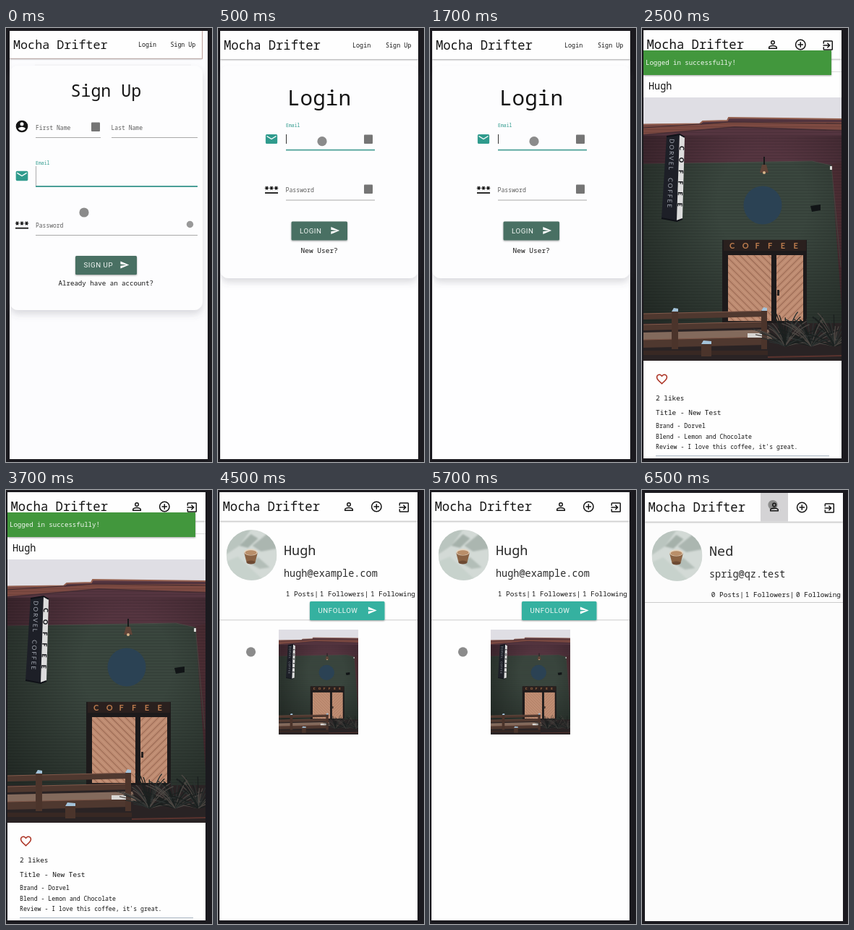
An HTML page for the animation above (8000 ms loop, 285x600 px).

```html
<!DOCTYPE html>
<html lang="en">
<head>
<meta charset="utf-8">
<title>Coffee app walkthrough</title>
<style>
html, body { margin: 0; width: 100%; height: 100%; overflow: hidden; background: #1b1a1f; }
svg { display: block; width: 100%; height: 100%; }
text { font-family: "Noto Sans Mono", "DejaVu Sans Mono", monospace; white-space: pre; }
.btn { font-family: Roboto, Inter, sans-serif; letter-spacing: .55px; }
.sign { font-family: Lato, Inter, sans-serif; }
</style>
</head>
<body>
<svg id="stage" viewBox="0 0 285 600"></svg>
<script>
const TEAL = '#2f9b8d', INK = '#151515', GREY = '#5c5c5c', LINE = '#a9a9a9';
const ICONS = {
  person: 'M12 5.9a2.1 2.1 0 110 4.2 2.1 2.1 0 010-4.2m0 9c2.97 0 6.1 1.46 6.1 2.1v1.1H5.9V17c0-.64 3.13-2.1 6.1-2.1M12 4a4 4 0 100 8 4 4 0 000-8zm0 9c-2.67 0-8 1.34-8 4v3h16v-3c0-2.66-5.33-4-8-4z',
  add: 'M13 7h-2v4H7v2h4v4h2v-4h4v-2h-4V7zm-1-5a10 10 0 100 20 10 10 0 000-20zm0 18a8 8 0 110-16 8 8 0 010 16z',
  exit: 'M10.1 15.6L11.5 17l5-5-5-5-1.4 1.4 2.6 2.6H3v2h9.7l-2.6 2.6zM19 3H5a2 2 0 00-2 2v4h2V5h14v14H5v-4H3v4a2 2 0 002 2h14a2 2 0 002-2V5a2 2 0 00-2-2z',
  account: 'M12 2a10 10 0 100 20 10 10 0 000-20zm0 3a3 3 0 110 6 3 3 0 010-6zm0 14.2a7.2 7.2 0 01-6-3.2c0-2 4-3.1 6-3.1s6 1.1 6 3.1a7.2 7.2 0 01-6 3.2z',
  mail: 'M20 4H4a2 2 0 00-2 2v12a2 2 0 002 2h16a2 2 0 002-2V6a2 2 0 00-2-2zm0 4l-8 5-8-5V6l8 5 8-5v2z',
  send: 'M2 21l21-9L2 3v7l15 2-15 2v7z',
  heart: 'M16.5 3c-1.74 0-3.41.81-4.5 2.09C10.91 3.81 9.24 3 7.5 3 4.42 3 2 5.42 2 8.5c0 3.78 3.4 6.86 8.55 11.54L12 21.35l1.45-1.32C18.6 15.36 22 12.28 22 8.5 22 5.42 19.58 3 16.5 3zm-4.4 15.55l-.1.1-.1-.1C7.14 14.24 4 11.39 4 8.5 4 6.5 5.5 5 7.5 5c1.54 0 3.04.99 3.57 2.36h1.87C13.46 5.99 14.96 5 16.5 5c2 0 3.5 1.5 3.5 3.5 0 2.89-3.14 5.74-7.9 10.05z'
};

const rect = (x, y, w, h, fill, extra = '') =>
  `<rect x="${x}" y="${y}" width="${w}" height="${h}" fill="${fill}" ${extra}/>`;
const circle = (x, y, r, fill) => `<circle cx="${x}" cy="${y}" r="${r}" fill="${fill}"/>`;
const ellipse = (x, y, rx, ry, fill) => `<ellipse cx="${x}" cy="${y}" rx="${rx}" ry="${ry}" fill="${fill}"/>`;
const poly = (points, fill) => `<polygon points="${points}" fill="${fill}"/>`;
const path = (d, stroke, width = 1) =>
  `<path d="${d}" fill="none" stroke="${stroke}" stroke-width="${width}"/>`;
// step is the advance of one monospaced character
const text = (s, x, y, step, fill = INK) =>
  `<text x="${x}" y="${y}" font-size="${step / .6}" fill="${fill}">${s}</text>`;
const icon = (name, x, y, size, fill = INK) =>
  `<path d="${ICONS[name]}" fill="${fill}" fill-rule="evenodd" transform="translate(${x - size / 2} ${y - size / 2}) scale(${size / 24})"/>`;
const pointer = (x, y) => circle(x, y, 6.6, '#8b8b8b');
const page = (x, y, fill) => rect(x, y, 274, 592, fill);
const card = (x, w, bottom) =>
  rect(x, 52, w, bottom - 52, '#fdfdfe', 'rx="12" filter="url(#soft)"');

function nav(x, y, w, bottom) {
  return rect(x, y, w, bottom - y, '#fefefe', 'filter="url(#drop)"');
}
function appNav(x, y) {
  return nav(x, y, 274, y + 39.5) + text('Mocha Drifter', x + 4.5, y + 26, 10.35) +
    icon('add', x + 217.3, y + 20, 18) + icon('exit', x + 255.3, y + 21, 18);
}
function button(label, x, y, w, fill) {
  return rect(x, y, w, 26, fill, 'rx="1.5" filter="url(#drop)"') +
    `<text class="btn" x="${x + 11.5}" y="${y + 16}" font-size="9.7" fill="#f4f8f6">${label}</text>` +
    icon('send', x + w - 17, y + 12.5, 13.5, '#fff');
}
const underline = (x1, x2, y) => path(`M${x1} ${y}H${x2}`, LINE);
function emailField(x, x2, label, y) {
  return text('Email', x, label, 3.9, TEAL) + path(`M${x} ${y}H${x2}`, '#4b9f97', 1.8);
}
function secret(x, y) {
  const stars = [3, 9.5, 16].map(d =>
    `M${x + d - 2.7} ${y}h5.4M${x + d - 1.4} ${y - 2.4}l2.8 4.8M${x + d + 1.4} ${y - 2.4}l-2.8 4.8`).join('');
  return path(stars, INK, 1.2) + path(`M${x + .5} ${y + 6.7}h18`, INK, 1.8);
}
const filler = (x, y) => rect(x, y, 12, 12.5, '#757575', 'rx="1"');
const avatar = (x, y) => `<use href="#avatar" x="${x}" y="${y}" width="70" height="70"/>`;
const photo = (x, y, w, h) => `<use href="#photo" x="${x}" y="${y}" width="${w}" height="${h}"/>`;

function profile(x, y, name, mail, posts, following) {
  return avatar(x + 9.5, y + 52) + text(name, x + 89, y + 87, 11.1, '#2a2a2a') +
    text(mail, x + 89, y + 116.5, 8.12, '#2a2a2a') +
    text(posts + ' Posts|', x + 91.8, y + 143.7, 5.63) +
    text('1 Followers|', x + 138.8, y + 143.7, 5.63) +
    text(following + ' Following', x + 209, y + 143.7, 5.63);
}

function plants() {
  let seed = 7, out = '';
  const rand = () => (seed = seed * 16807 % 2147483647) / 2147483647;
  for (let i = 0; i < 110; i++) {
    const x = [198, 234, 266][i % 3], a = -Math.PI * (.05 + .9 * rand()), r = 22 + 32 * rand();
    out += path(`M${x} 440Q${x + Math.cos(a) * r * .5} ${440 + Math.sin(a) * r * .8} ${x + Math.cos(a) * r} ${440 + Math.sin(a) * r}`,
      ['#1b201f', '#2b3130', '#4d4844'][i % 7 % 3], 1.3);
  }
  return out;
}

function signText(s, x, y, size, gap, fill, weight) {
  return `<text class="sign" transform="translate(${x} ${y}) rotate(92)" font-size="${size}" letter-spacing="${gap}" font-weight="${weight}" fill="${fill}">${s}</text>`;
}

function shopFront() {
  const bricks = (points, fill) => poly(points, fill) + poly(points, 'url(#bricks)');
  const rail = (y, h) => poly(`2,${y + 4} 173,${y} 173,${y + h} 2,${y + h + 4}`, '#4f382f') +
    path(`M2 ${y + 4}L173 ${y}`, '#80594a', 1.2);
  const post = (x, y, w, h) => rect(x, y, w, h, '#4b342b') +
    poly(`${x},${y + 1} ${x + 3},${y - 4} ${x + w},${y - 3} ${x + w},${y + 1}`, '#a4c3da');
  return rect(2, 96, 274, 364, '#dfdee4') +
    bricks('2,133 80,132 84,129 118,128 120,124 276,126 276,460 2,460', '#553540') +
    bricks('2,135 80,134 120,130 276,130 276,141 128,136 2,147', '#7d4a42') +
    path('M2 133.5L80 132.5L84 129L118 128L120 124L276 126', '#94604f', 2) +
    path('M2 138L122 130L276 132M2 148L128 137L276 142', '#432c30', 1.2) +
    bricks('2,188 235,184 262,190 276,300 276,460 2,460', '#3a463e') +
    bricks('262,188 276,185 276,385 272,330', '#543239') +
    path('M2 188L235 184L262 190L275 330', '#4e514a', .9) +
    rect(2, 149, 274, 311, 'url(#shade)') +
    // blade sign
    poly('34,150 52,147 48,267 27,263', '#1d1f27') + poly('52,147 59,151 56,264 48,267', '#dddddd') +
    path('M34 150L52 147L59 151M27 263L48 267L56 264', '#0f1117', 2) +
    signText('DORVEL', 38.5, 153, 8.5, 1.9, '#a5aab4', 400) + signText('COFFEE', 36.5, 207, 8.5, 1.9, '#a5aab4', 400) +
    signText('COFFEE', 52, 163, 9, 10, '#17181c', 900) +
    circle(167, 245, 26.5, '#2b4254') +
    // lamps
    path('M169 178V190', '#191a1b', 2) + poly('166,189 172,189 175,200 163,200', '#604438') + circle(169, 200, 2, '#d8b58b') +
    poly('233,246 247,244 247,252 235,254', '#111416') + rect(260, 191, 3, 5, '#d9d9d6') +
    // doorway
    rect(111, 293, 117, 116, '#1d1a1b') + rect(113, 293, 114, 15, '#2a201e') +
    [...'COFFEE'].map((c, i) => `<text class="sign" x="${121 + i * 17.7}" y="304.5" font-size="11" font-weight="700" fill="#bb7b4d">${c}</text>`).join('') +
    rect(119, 314, 60, 91, 'url(#planksL)') + rect(186, 314, 37, 91, 'url(#planksR)') +
    rect(187, 362, 3, 8, '#262120') +
    // pavement and fence
    rect(2, 408, 274, 52, '#2a2324') + poly('2,421 175,417 180,430 2,432', '#836a5c') +
    rail(391, 8) + rail(406, 8) + rail(427, 11) + rect(2, 446, 172, 6, '#382823') +
    post(41, 391, 9, 53) + post(165, 390, 8, 54) + post(82, 436, 14, 18) + rect(146, 422, 20, 6, '#d8d6d3') +
    plants() + poly('174,442 276,440 276,460 174,460', '#292324') + path('M174 455L276 453', '#5a332e', 2);
}

const planks = (id, angle) =>
  `<pattern id="${id}" width="7" height="7" patternUnits="userSpaceOnUse" patternTransform="rotate(${angle})">${rect(0, 0, 7, 7, '#bd8a70')}${path('M0 .5H7', '#8f614b', .8)}${path('M0 4H7', '#c6957b', 1.5)}</pattern>`;

const defs = `<defs>
  <filter id="drop" x="-10%" y="-20%" width="120%" height="160%"><feDropShadow dx="0" dy="1" stdDeviation="1" flood-opacity=".36"/></filter>
  <filter id="soft" x="-10%" y="-10%" width="120%" height="120%"><feDropShadow dx="0" dy="6" stdDeviation="5" flood-color="#55556a" flood-opacity=".2"/></filter>
  <filter id="blur"><feGaussianBlur stdDeviation="1.3"/></filter>
  <radialGradient id="shade" cx=".6" cy=".3" r=".75"><stop offset=".3" stop-opacity="0"/><stop offset="1" stop-opacity=".4"/></radialGradient>
  <pattern id="bricks" width="11" height="4" patternUnits="userSpaceOnUse"><path d="M0 .5H11" stroke="#000" stroke-width=".8" opacity=".14"/></pattern>
  ${planks('planksL', 45)}${planks('planksR', -45)}
  <clipPath id="disc"><circle cx="35" cy="35" r="35"/></clipPath>
  <symbol id="photo" viewBox="2 96 274 364" preserveAspectRatio="none">${shopFront()}</symbol>
  <symbol id="avatar" viewBox="0 0 70 70"><g clip-path="url(#disc)">
    ${rect(0, 0, 70, 70, '#d3dad6')}
    <g filter="url(#blur)">${poly('0,0 34,0 18,22 0,34', '#bac5bf')}${poly('18,22 34,6 44,12 30,25', '#a5b1aa')}
    ${poly('36,22 56,6 70,14 70,26 48,30', '#abb6b0')}${poly('0,44 16,37 28,48 52,70 0,70', '#c7d2cc')}
    ${poly('32,46 44,38 60,52 46,54', '#b3beb8')}</g>
    ${poly('24.5,31 43.5,31 40,45 28,45', '#8a6243')}${ellipse(34, 45, 6, 2.5, '#6d4a33')}
    ${ellipse(34, 31, 9.5, 4.5, '#e3d5c2')}${ellipse(34, 31.7, 8, 3.4, '#b98e69')}
  </g></symbol>
</defs>`;

const signUp = page(5, 4, '#fcfcfe') + card(5, 267, 390) + rect(271, 4, 1, 39, '#dcb8b2') + nav(5, 4, 266, 42) +
  path('M5 42.3H271', '#bfa6a3', .8) + path('M40 51H256', '#eeeef0') +
  text('Mocha Drifter', 10, 29.3, 10.05) + text('Login', 183, 26, 5) + text('Sign Up', 227.5, 26, 4.95) +
  text('Sign Up', 89.5, 94.5, 13.95) +
  icon('account', 22, 136, 20) + text('First Name', 41, 141, 4.83, GREY) + underline(41, 131, 151.5) + filler(118, 130.5) +
  text('Last Name', 145.5, 141, 4.83, GREY) + underline(146, 265, 151.5) +
  icon('mail', 22, 204.5, 20, TEAL) + emailField(41, 265, 188.5, 219) + path('M41.5 191V218', '#999', .8) +
  secret(12.5, 270) + text('Password', 41, 275.7, 4.8, GREY) + underline(41, 265, 286.5) + circle(254.5, 271.5, 4.7, '#999') +
  pointer(108, 255) + button('SIGN UP', 96, 315, 85, '#4a6f64') + text('Already have an account?', 72.5, 356, 5.48);

const login = page(3, 4, '#fefeff') + card(3, 274, 346) + nav(3, 4, 274, 43) +
  text('Mocha Drifter', 8, 30, 10.3) + text('Login', 186, 26.7, 5.05) + text('Sign Up', 232, 26.7, 5.05) +
  text('Login', 96, 107, 17.6) +
  icon('mail', 74, 153.5, 19.5, TEAL) + emailField(94, 217, 137, 168.7) + path('M94.5 147V160', '#333') + filler(202, 147.5) +
  secret(64.5, 221.3) + text('Password', 93.5, 227, 4.93, GREY) + underline(94, 217, 238) + filler(202, 216.5) +
  pointer(144, 156.7) + button('LOGIN', 101.5, 267.5, 77.5, '#4a6f64') + text('New User?', 114.5, 310.7, 5.7);

const post = page(2, 3, '#fefefe') + path('M2 60.5H276', '#ddd') + appNav(2, 3) + icon('person', 181, 23, 18) +
  rect(2, 31, 260, 34, '#42973e', 'filter="url(#drop)"') + text('Logged in successfully!', 5, 51, 5.43, '#f3f8f2') +
  text('Hugh', 9, 85, 8.1) + photo(2, 96, 274, 364) + icon('heart', 27.5, 485.5, 18.5, '#ac3425') +
  text('2 likes', 19, 515, 5.65) + text('Title - New Test', 19, 535, 5.66) +
  text('Brand - Dorvel', 19, 553, 4.93) + text('Blend - Lemon and Chocolate', 19, 567.7, 4.93) +
  text("Review - I love this coffee, it's great.", 19, 582, 4.92) + path('M19 591.5H259', '#a9b5c2');

const followed = page(2, 3, '#fefefe') + appNav(2, 3) + icon('person', 181, 23, 18) +
  profile(2, 3, 'Hugh', 'hugh@example.com', 1, 1) + path('M2 179.8H276', '#ccc') +
  button('UNFOLLOW', 127, 154, 103.5, '#35b1a0') + photo(84, 193, 110, 145) + pointer(45.5, 223.8);

const own = page(4, 4, '#fcfcfc') + appNav(4, 4) + rect(164, 4, 38, 39.5, '#d4d3d5') +
  pointer(181, 20.5) + icon('person', 183, 23.5, 18) +
  profile(4, 4, 'Ned', 'sprig@qz.test', 0, 0) + path('M4 155.5H278', '#ccc');

const scenes = [[0, signUp], [500, login], [2500, post], [4500, followed], [6500, own]];
const stage = document.getElementById('stage');
stage.innerHTML = defs + scenes.map(([, art]) => `<g>${art}</g>`).join('');
const groups = stage.querySelectorAll(':scope > g');
const begin = performance.now();

function draw(now) {
  const t = Math.max(0, now - begin) % 8000;
  const current = scenes.findLastIndex(([start]) => t >= start);
  groups.forEach((g, i) => { g.style.display = i === current ? '' : 'none'; });
  requestAnimationFrame(draw);
}
draw(begin);
</script>
</body>
</html>
```
